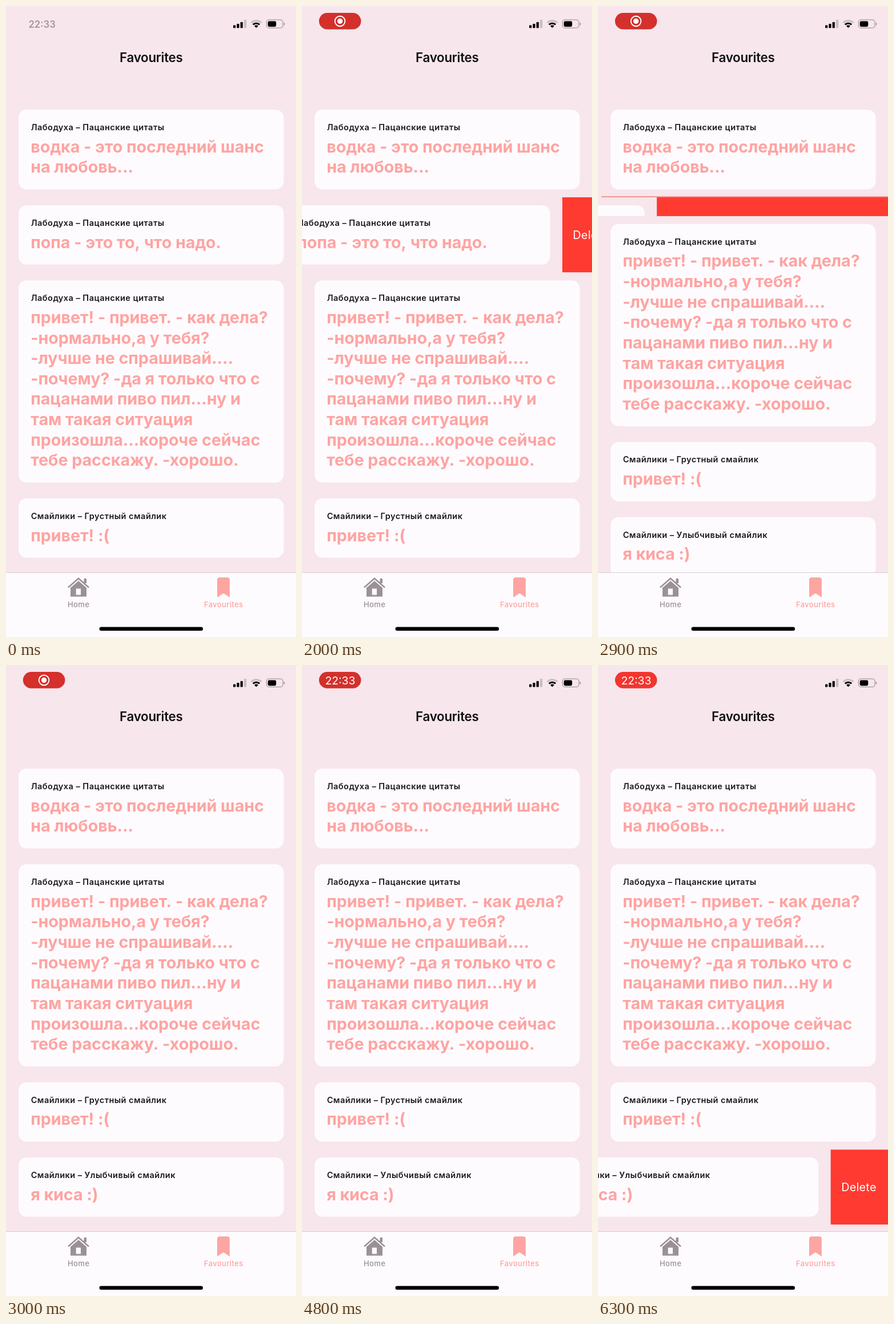
Animation, 508 px wide and 1102 px high, one loop 6.4 s. Source, as an HTML page with a canvas:

```html
<!DOCTYPE html>
<html lang="ru">
<head>
<meta charset="utf-8">
<title>Favourites</title>
<style>
html, body { margin: 0; width: 100%; height: 100%; overflow: hidden; background: #f7e6ec; }
canvas { display: block; width: 508px; height: 1102px; }
</style>
</head>
<body>
<canvas id="stage"></canvas>
<script>
const W = 508, H = 1102, LOOP = 6400, STEP = 100;
const BG = '#f7e6ec', PAPER = '#fefbfe', PINK = '#fea4a2', INK = '#1a171b', GREY = '#9a9197', RED = '#ff3a31';
const LINE = 35.65, GAP = 27.6, LIST_TOP = 167.2, OPEN = 100.4;

const canvas = document.getElementById('stage');
const ctx = canvas.getContext('2d');
const dpr = window.devicePixelRatio || 1;
canvas.width = W * dpr;
canvas.height = H * dpr;

const quotes = 'Лабодуха – Пацанские цитаты';
const cards = [
  { title: quotes, lines: ['водка - это последний шанс', 'на любовь...'] },
  { title: quotes, lines: ['попа - это то, что надо.'] },
  { title: quotes, lines: [
    'привет! - привет. - как дела?', '-нормально,а у тебя?', '-лучше не спрашивай....',
    '-почему? -да я только что с', 'пацанами пиво пил...ну и', 'там такая ситуация',
    'произошла...короче сейчас', 'тебе расскажу. -хорошо.'] },
  { title: 'Смайлики – Грустный смайлик', lines: ['привет! :('] },
  { title: 'Смайлики – Улыбчивый смайлик', lines: ['я киса :)'] }
];

const clamp = x => Math.max(0, Math.min(1, x));
const mix = (a, b, k) => a + (b - a) * k;
const easeOut = x => 1 - (1 - x) ** 2;
const smooth = x => x * x * (3 - 2 * x);
const span = (t, from, to) => clamp((t - from) / (to - from));

function text(str, x, y, size, weight, color, spacing = 0, align = 'left') {
  ctx.font = `${weight} ${size}px Inter, Roboto, sans-serif`;
  ctx.letterSpacing = spacing + 'px';
  ctx.textAlign = align;
  ctx.fillStyle = color;
  ctx.fillText(str, x, y);
}

function rect(x, y, w, h, color) {
  ctx.fillStyle = color;
  ctx.fillRect(x, y, w, h);
}

function round(x, y, w, h, r, color) {
  ctx.beginPath();
  ctx.roundRect(x, y, w, h, r);
  ctx.fillStyle = color;
  ctx.fill();
}

function poly(points, color) {
  ctx.beginPath();
  points.forEach(([x, y]) => ctx.lineTo(x, y));
  ctx.closePath();
  ctx.fillStyle = color;
  ctx.fill();
}

function circle(x, y, r, color) {
  ctx.beginPath();
  ctx.arc(x, y, r, 0, Math.PI * 2);
  ctx.fillStyle = color;
  ctx.fill();
}

// Finger drags slightly past the button, then the row settles back.
function swipe(t, start, dragged, release, rest, peak) {
  const pulled = peak * smooth(span(t, start, dragged));
  return pulled + (OPEN - peak) * smooth(span(t, release, rest));
}

function drawCard(card, y, shift) {
  const x = 22 - shift, top = y + GAP / 2;
  round(x, top, 464.5, 68 + LINE * card.lines.length, 14, PAPER);
  text(card.title, x + 21.7, top + 35.9, 14.5, 600, INK, 0.48);
  card.lines.forEach((line, i) =>
    text(line, x + 21.2, top + 74.7 + i * LINE, 28.7, 700, PINK, -0.07));
}

function drawRow(card, y, height, shift) {
  ctx.save();
  ctx.beginPath();
  ctx.rect(0, y, W, height);
  ctx.clip();
  drawCard(card, y, shift);
  if (shift > 0) {
    const left = W - shift;
    rect(left, y, shift, height, RED);
    text('Delete', left + 18.6, y + 73, 19.7, 400, '#fff', 0.3);
  }
  ctx.restore();
}

function drawList(t) {
  const gone = easeOut(span(t, 2800, 3000));
  const first = mix(swipe(t, 1800, 2200, 2200, 2500, 104), 506.5, gone);
  const second = swipe(t, 5000, 5300, 5700, 6000, 106.6);
  let y = LIST_TOP;
  cards.forEach((card, i) => {
    let height = 68 + GAP + LINE * card.lines.length;
    if (i === 1) height *= 1 - gone;
    if (height > 0 && y < 990) drawRow(card, y, height, i === 1 ? first : i === 4 ? second : 0);
    if (i === 1 && gone > 0 && gone < 1) rect(6, y - 1.6, W - 6, 1.4, '#ee7772');
    y += height;
  });
}

function drawTabs() {
  rect(0, 989, W, H - 989, PAPER);
  rect(0, 989, W, 1, '#d6cbd1');

  poly([[127, 1004], [141, 1016], [141, 1031.5], [113, 1031.5], [113, 1016]], GREY);
  rect(122.7, 1017.5, 8.3, 11, PAPER);
  ctx.beginPath();
  ctx.moveTo(109.8, 1014.8);
  ctx.lineTo(127, 999.8);
  ctx.lineTo(144.2, 1014.8);
  ctx.lineWidth = 5;
  ctx.strokeStyle = PAPER;
  ctx.stroke();
  ctx.lineWidth = 2.6;
  ctx.lineCap = 'round';
  ctx.strokeStyle = GREY;
  ctx.stroke();
  ctx.lineCap = 'butt';
  rect(136.5, 1000, 4.5, 8, GREY);

  round(370, 998, 21.8, 28, [4, 4, 0, 0], PINK);
  poly([[370, 1025], [391.8, 1025], [391.8, 1033], [380.9, 1025.5], [370, 1033]], PINK);

  text('Home', 127.2, 1050.3, 13.1, 500, GREY, 0.35, 'center');
  text('Favourites', 381.1, 1050.3, 13.1, 500, PINK, 0.35, 'center');
  round(163.5, 1084.5, 181.5, 6.6, 3.3, '#000');
}

function drawStatus() {
  const faint = '#c9bdc3';
  [5, 7.5, 10.5, 14.5].forEach((h, i) =>
    round(398 + i * 6.3, 38.5 - h, 4.2, h, 1.2, i < 3 ? '#000' : faint));

  const wifi = (r, width, color) => {
    ctx.beginPath();
    ctx.arc(438.4, 38.3, r, -Math.PI * 0.75, -Math.PI * 0.25);
    ctx.lineWidth = width;
    ctx.strokeStyle = color;
    ctx.stroke();
  };
  wifi(12.6, 2.9, faint);
  wifi(8.1, 2.9, '#000');
  wifi(2.4, 4.8, '#000');

  ctx.beginPath();
  ctx.roundRect(456.4, 24.2, 28.6, 14.2, 4.3);
  ctx.lineWidth = 1.3;
  ctx.strokeStyle = '#a59aa0';
  ctx.stroke();
  round(458.7, 26.4, 14.5, 9.8, 2.4, '#000');
  round(486.6, 28.9, 1.9, 5, [0, 2, 2, 0], '#a59aa0');
}

function drawRecorder(t) {
  const shown = span(t, 0, 200);
  if (shown < 1) {
    ctx.globalAlpha = 1 - shown;
    text('22:33', 39.4, 37.6, 16.7, 600, '#a5979e');
  }
  if (shown > 0) {
    const glow = 0.5 - 0.5 * Math.cos((t - 184) / 920 * Math.PI * 2);
    const rgb = [mix(211, 251, glow), mix(48, 54, glow), mix(44, 47, glow)].map(Math.round);
    ctx.globalAlpha = shown;
    round(29.8, 12, 73.6, 28.8, 14.4, `rgb(${rgb})`);
    if (t < 3200) {
      ctx.beginPath();
      ctx.arc(66.5, 26.5, 8.8, 0, Math.PI * 2);
      ctx.lineWidth = 1.9;
      ctx.strokeStyle = '#fff';
      ctx.stroke();
      circle(66.5, 26.5, 4.7, '#fff');
    } else {
      text('22:33', 66.9, 33.6, 19.3, 400, '#fff', 0, 'center');
    }
  }
  ctx.globalAlpha = 1;
}

function draw(now) {
  const t = Math.floor((now % LOOP) / STEP) * STEP;
  ctx.setTransform(dpr, 0, 0, dpr, 0, 0);
  rect(0, 0, W, H, BG);
  drawList(t);
  text('Favourites', 254.3, 98, 22.3, 600, '#111014', -0.25, 'center');
  drawStatus();
  drawRecorder(t);
  drawTabs();
}

let start;
function tick(now) {
  if (start === undefined) start = now;
  draw(now - start);
  requestAnimationFrame(tick);
}
draw(0);
requestAnimationFrame(tick);
</script>
</body>
</html>
```
